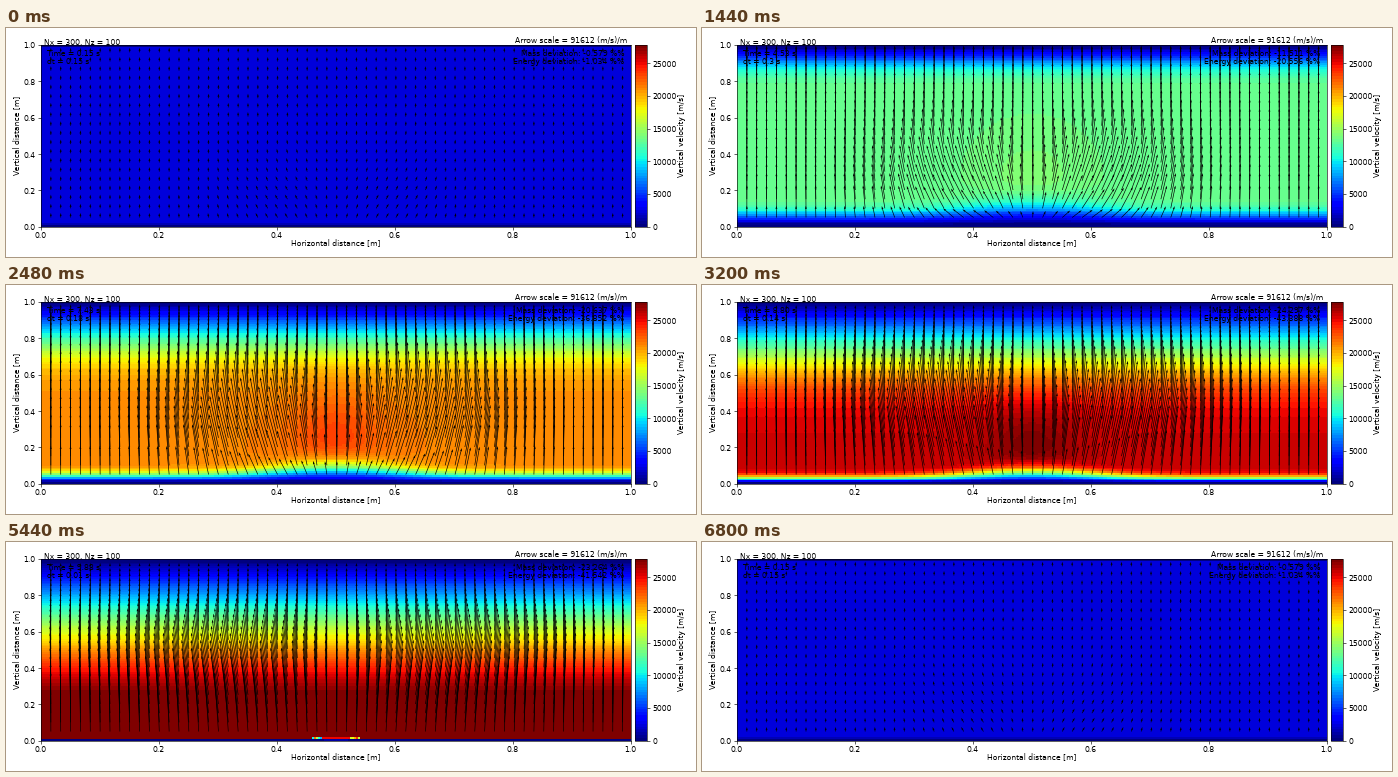
Recreate the animation shown at these times as a matplotlib script. Size 690 by 229 pixels, loop 6880 ms.

```python
import numpy as np
import matplotlib.pyplot as plt
from matplotlib.animation import FuncAnimation

W, H, DPI = 690, 229, 72
FRAMES, INTERVAL = 86, 80
NX, NZ, STEP = 300, 100, 5
VMAX, SCALE = 27760, 91612
LEFT, RIGHT, TOP, BOTTOM = 35, 624.5, 17, 198.7

u = 55 / 72  # size of one design point in pixels
plt.rcParams.update({
    "font.family": "DejaVu Sans", "font.size": 10 * u, "text.hinting": "native",
    "axes.linewidth": 0.8 * u, "xtick.major.pad": 2, "ytick.major.pad": 3.5 * u,
    **{f"{a}tick.major.{k}": v * u for a in "xy"
       for k, v in (("size", 3.5), ("width", 0.8))},
})

X, Z = np.meshgrid(np.linspace(0, 1, NX), np.linspace(0, 1, NZ))
S = X - 0.5
cut = (slice(STEP, None, STEP), slice(STEP, None, STEP))


def softmin(a, b, p):
    return (a ** -float(p) + b ** -float(p)) ** (-1 / p)


def hump(n, length):
    return np.sin(np.pi * min(n / length, 1))


def pocket_width(n):
    return max(.412 - .0054 * n, 0) if n >= 48 else 0


def add_pocket(w, n):
    """Slow, shrinking lens on the bottom with a noisy rim."""
    width = pocket_width(n)
    if not width:
        return w
    r = np.abs(S) / width
    peak = min(.036, .33 * width)
    top = peak * np.clip(1 - r ** 2, 0, 1) ** .25
    w = np.where(Z < top, .83 * w, w)
    w = np.where((Z < top - .014) & (r < .9), 1200, w)
    rim = (np.abs(Z - .6 * peak) < .006) & (r > .5) & (r < .9)
    noise = np.random.default_rng(n).uniform(7000, 24000, X.shape)
    return np.where(rim, noise, w)


def rising(n):
    """Steady acceleration, capped, with still layers at lid and floor."""
    core = softmin(2300 + 615 * n, 31000, 8)
    warm = .1 * hump(n, 62) ** 2
    core = core * (1 + warm * np.exp(-(S / .08) ** 2 - ((Z - .25) / .25) ** 2))
    lid = (26000 + 1.12e6 / (n + 1)) * (1 - Z) + 1e-3
    depth = max(.005, min(.119 - .002 * n, .012 + .005 * n))
    depth = depth + .055 * hump(n, 56) * np.exp(-(S / .13) ** 2)
    return add_pocket(softmin(core, lid, 6) * np.tanh((Z / depth) ** 1.5), n)


def sideways(n):
    """Outflow from the middle that widens, climbs and fades."""
    q = n / (FRAMES - 1)
    strength = (1400 + 7000 * (1 - np.exp(-n / 9))) * (1 - .6 * q)
    s = S / ((.105 + .1 * q) * (.85 + .3 * Z))
    mid = .07 + .2 * q
    reach = np.where(Z > mid, .3, .15 + .08 * q)
    return strength * s * np.exp(.5 - s ** 2 / 2 - ((Z - mid) / reach) ** 2)


def time_step(n):
    return .01 if pocket_width(n) else min(.15 + .01 * n, 5.45 / max(n, 1))


def energy_loss(n):
    return np.interp(n, [0, 18, 31, 40, 56, 68],
                     [-1.034, -20.556, -36.852, -43.388, -43.992, -41.542])


def box(left, right):
    return [left / W, 1 - BOTTOM / H, (right - left) / W, (BOTTOM - TOP) / H]


fig = plt.figure(figsize=(W / DPI, H / DPI), dpi=DPI, facecolor="white")
ax = fig.add_axes(box(LEFT, RIGHT))
cax = fig.add_axes(box(629, 641))

im = ax.imshow(rising(0), origin="lower", extent=(0, 1, 0, 1), aspect="auto",
               cmap=plt.get_cmap("jet", 64), vmin=0, vmax=VMAX,
               interpolation="nearest")
arrows = ax.quiver(X[cut], Z[cut], sideways(0)[cut], rising(0)[cut],
                   units="width", width=.65 / (RIGHT - LEFT),
                   scale=SCALE, scale_units="y", angles="uv")
ax.set(xlim=(0, 1), ylim=(0, 1), xlabel="Horizontal distance [m]",
       ylabel="Vertical distance [m]")
bar = fig.colorbar(im, cax=cax, ticks=range(0, 25001, 5000))
bar.set_label("Vertical velocity [m/s]")

cx, cy = (LEFT + RIGHT) / 2, (TOP + BOTTOM) / 2
for axis, px, py in ((ax.xaxis, cx, 215.5), (ax.yaxis, 11.3, cy),
                     (cax.yaxis, 676, cy)):
    axis.label.set_va("center")
    axis.set_label_coords(px / W, 1 - py / H, transform=fig.transFigure)


def label(px, py, ha, s=""):
    return fig.text(px / W, 1 - py / H, s, ha=ha, va="baseline")


label(38, 16.8, "left", f"Nx = {NX}, Nz = {NZ}")
label(621.5, 15, "right", f"Arrow scale = {SCALE} (m/s)/m")
time_text = label(41, 28, "left")
dt_text = label(41, 35.6, "left")
mass_text = label(618.6, 28, "right")
energy_text = label(618.6, 35.6, "right")


def update(i):
    n = i % (FRAMES - 1)  # the last picture is the starting one again
    w = rising(n)
    im.set_data(w)
    arrows.set_UVC(sideways(n)[cut], w[cut])
    elapsed = sum(time_step(k) for k in range(n + 1))
    energy = energy_loss(n)
    time_text.set_text(f"Time = {elapsed:.2f} s")
    dt_text.set_text(f"dt = {round(time_step(n), 2):g} s")
    mass_text.set_text(f"Mass deviation: {.56 * energy:.3f} %%")
    energy_text.set_text(f"Energy deviation: {energy:.3f} %%")
    return im, arrows, time_text, dt_text, mass_text, energy_text


anim = FuncAnimation(fig, update, frames=FRAMES, interval=INTERVAL,
                     repeat=True, repeat_delay=0, blit=False)
plt.show()
```
